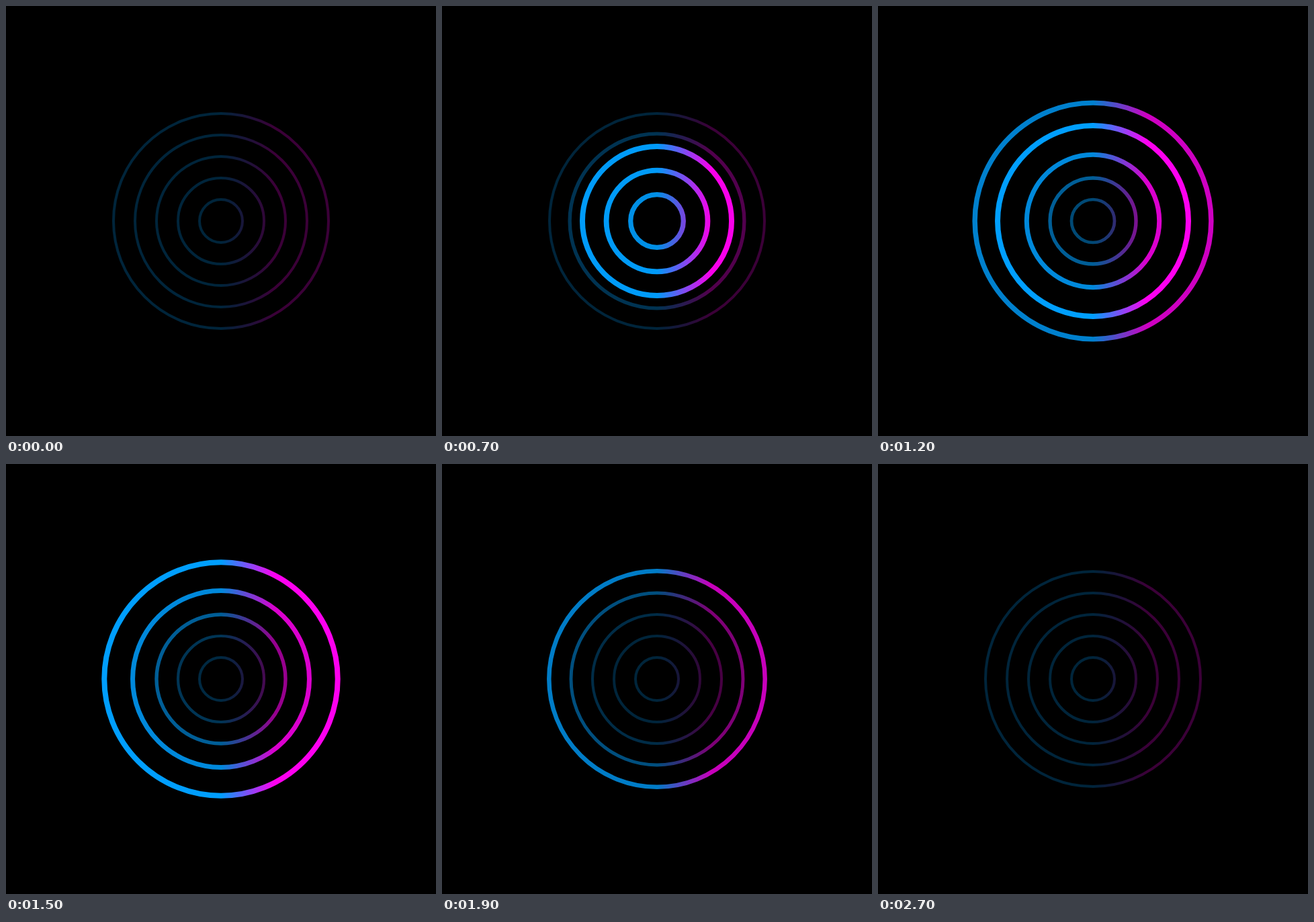
Recreate the animation shown at these times as an HTML page. Size 640 by 640 pixels, loop 4800 ms.

```html
<!DOCTYPE html>
<html lang="en">
<head>
<meta charset="utf-8">
<title>Pulsing rings</title>
<style>
  html, body { margin: 0; width: 100%; height: 100%; overflow: hidden; background: #000; }
  svg { display: block; width: 100%; height: 100%; }
</style>
</head>
<body>
<svg viewBox="0 0 640 640">
  <defs>
    <linearGradient id="hue" gradientUnits="userSpaceOnUse" x1="320" y1="0" x2="400" y2="0">
      <stop offset="0" stop-color="#009fff"/>
      <stop offset="1" stop-color="#ff00f0"/>
    </linearGradient>
  </defs>
  <g id="rings" fill="none" stroke="url(#hue)"></g>
</svg>
<script>
const LOOP = 4800, STEP = 100, END = 2700, REST = 0.23;

// Swell: start, peak and fall time of the radius; lit: start and peak of the glow.
const rings = [
  { r: 32, start: 0, peak: 310, fall: 740, swell: 16, lit: [0, 310] },
  { r: 64, start: 90, peak: 460, fall: 740, swell: 15, lit: [50, 450] },
  { r: 96, start: 300, peak: 750, fall: 620, swell: 15.5, lit: [300, 750] },
  { r: 128, start: 600, peak: 1050, fall: 650, swell: 16, lit: [600, 1050] },
  { r: 160, start: 700, peak: 1300, fall: 690, swell: 17, lit: [900, 1350] }
];

const clamp = x => Math.max(0, Math.min(1, x));
const ramp = (t, a, b) => clamp((t - a) / (b - a));
const ease = x => (1 - Math.cos(Math.PI * x)) / 2;
const mix = (a, b, k) => a + (b - a) * k;

// Eased rise from start to peak, a short hold, then an eased fall.
const pulse = (t, start, peak, hold, fall) => t < peak
  ? ease(ramp(t, start, peak))
  : 1 - ease(ramp(t, peak + hold, peak + hold + fall));

const group = document.getElementById("rings");
for (const ring of rings) {
  ring.node = document.createElementNS("http://www.w3.org/2000/svg", "circle");
  ring.node.setAttribute("cx", 320);
  ring.node.setAttribute("cy", 320);
  group.append(ring.node);
}

function draw(t) {
  for (const { r, start, peak, fall, swell, lit: [on, full], node } of rings) {
    const grow = pulse(t, start, peak, 0, fall);
    const glow = pulse(t, on, full, 100, 1250);
    const weight = Math.pow(glow, t < full ? 0.5 : 1.4);
    node.setAttribute("r", r + swell * grow);
    node.setAttribute("stroke-width", 4 + 4 * weight);
    node.setAttribute("stroke-opacity", mix(REST, 1, glow));
  }
}

const origin = performance.now();
function tick() {
  const t = (performance.now() - origin) % LOOP;
  draw(Math.min(END, Math.floor(t / STEP) * STEP));
  requestAnimationFrame(tick);
}
tick();
</script>
</body>
</html>
```
